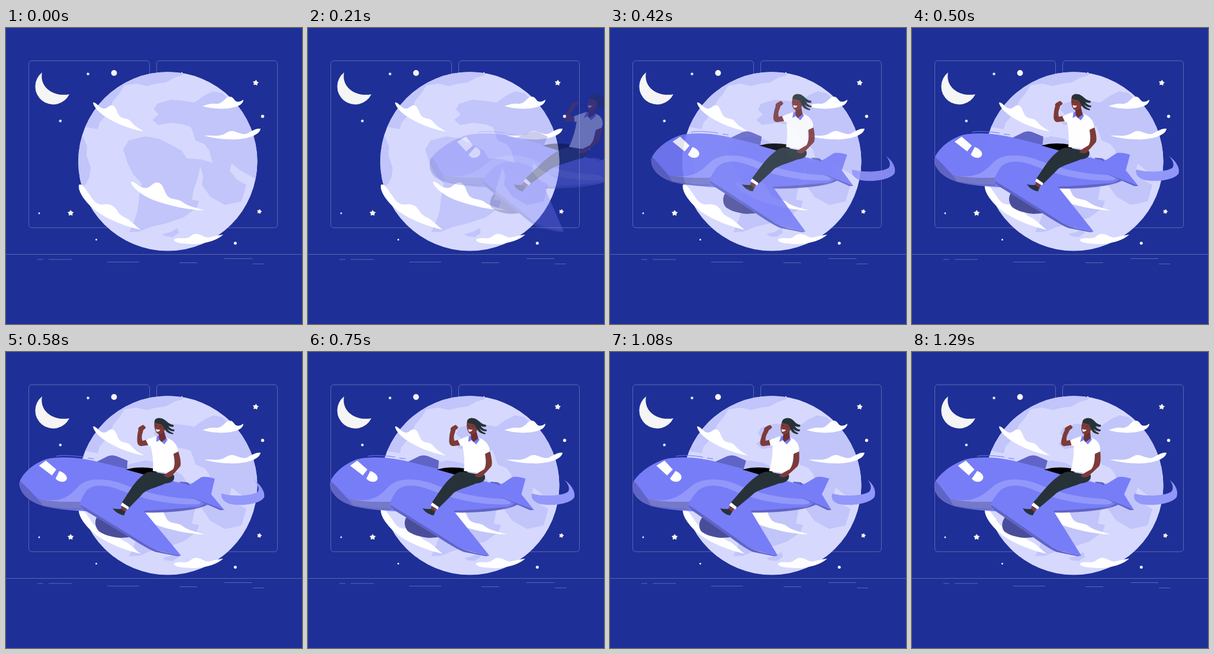
Animation of 500 by 500 pixels, one loop 1.33 s. Source, as an HTML page:

```html
<!DOCTYPE html>
<html lang="en">
<head>
<meta charset="utf-8">
<title>Night flight</title>
<style>
  html, body { margin: 0; height: 100%; overflow: hidden; background: #1e2f97; }
  svg { display: block; width: 100vw; height: 100vh; }
</style>
</head>
<body>
<svg viewBox="0 0 500 500">
  <defs>
    <clipPath id="disc"><circle cx="273.3" cy="225.4" r="151.2"/></clipPath>
    <path id="star" d="M0-1L.36-.42 1-.3 .55.18 .6.85 0 .56-.6.85-.55.18-1-.3-.36-.42Z" stroke-width=".25" stroke-linejoin="round"/>
  </defs>

  <g fill="none" stroke="#fff" stroke-opacity=".27">
    <rect x="38.5" y="55.3" width="204" height="282" rx="5"/>
    <rect x="254.5" y="55.3" width="204" height="282" rx="5"/>
    <path d="M0 382.4H500M53 391h10M72 391h39M171 395.4h54M293 396.5h30M369 389.5h47M417 398.5h19"/>
  </g>

  <g fill="#f5f5f5">
    <path d="M61 75A30.3 30.3 0 1 0 107 112C80 117 56 100 61 75Z"/>
    <circle cx="182.5" cy="76" r="4.9"/>
    <circle cx="433.5" cy="149.2" r="2.7"/>
    <circle cx="387.3" cy="363.6" r="2.5"/>
    <circle cx="152.5" cy="357.6" r="1.5"/>
    <circle cx="56" cy="313" r="1.4"/>
    <circle cx="297" cy="76" r="1.3"/>
    <g stroke="#f5f5f5">
      <use href="#star" transform="translate(138.5 77.6) rotate(-10) scale(2.4)"/>
      <use href="#star" transform="translate(91.8 157) rotate(-10) scale(2.4)"/>
      <use href="#star" transform="translate(421.8 92.6) rotate(8) scale(4.3)"/>
      <use href="#star" transform="translate(109.2 312.6) scale(4.4)"/>
      <use href="#star" transform="translate(428 310) rotate(15) scale(3.6)"/>
    </g>
  </g>

  <g clip-path="url(#disc)">
    <path fill="#d6d9fd" d="M120 70H430V380H120Z"/>
    <path fill="#c1c5fa" d="M120 165L138 168 155 171 158 160 174 142 181 123 192 110 200 97 220 94 238 98 254 94 270 92 284 84 298 80 300 60H120Z
      M120 180L130 183 137 200 136 215 143 236 141 252 135 264 120 270Z
      M247 155L257 164 280 160 300 163 312 167 317 180 320 190 335 196 343 206 349 228 330 222 305 220 297 207 280 198 258 187 235 183 207 190 198 205 206 230 215 247 229 263 225 285 222 310 215 330 208 345 225 344 245 336 270 330 300 320 322 304 326 292 314 290 318 270 325 250 328 234 333 250 331 265 345 285 370 299 398 293 406 265 390 256 378 241 381 229 395 240 420 254 430 254V130L400 125 378 122 366 110 350 107 335 114 318 126 300 123 278 121 255 128 250 138 258 146Z
      M264 348L277 345 290 338 292 346 282 353 270 352Z"/>
  </g>

  <path fill="#fff" d="M147 126C152 124 157 135 164 136C172 137 174 128 181 131C188 135 187 147 195 151C201 154 206 152 211 158C218 167 226 170 233 175C210 171 185 161 168 150C156 142 148 133 147 126Z
    M332 132C340 129 347 127 354 128C367 129 370 116 378 116C385 116 385 124 391 124.500C395 125 398 123 401 121C401 128 393 133 380 135C364 138 346 136 332 132Z
    M335 182C345 181 355 183 363 181C372 179 375 173 383 174C392 176 397 180 405 179C413 176 420 169 430 170C429 180 410 187 390 188C370 189 350 186 335 182Z
    M211 260C216 257 222 268 233 270C245 272 246 260 256 261C266 262 267 277 273 284C281 291 289 288 297 293C306 301 322 304 335 308C310 308 275 300 250 291C230 283 213 270 211 260Z
    M123 265C129 261 136 275 143 284C150 296 157 299 165 298C174 297 181 299 187 307C190 313 194 317 203 321C213 327 219 335 228 341C205 336 175 325 155 311C137 298 121 278 123 265Z
    M284 357C292 353 301 357 308 354C314 351 316 347 323 348C331 349 335 354 342 354C352 352 358 350 367 349C357 358 340 364 320 365C300 365 282 363 284 357Z"/>

  <g id="flight" opacity="0">
    <!-- plane -->
    <path fill="#9297fa" d="M376 239C395 245 428 243 438 236C443 230 440 222 435 216C447 225 450 237 447 245C440 256 408 261 388 257C377 254 373 247 376 239Z"/>
    <path fill="#5f64c6" d="M175 186L197 176Q205 173 212 176L229 183.500 225 198ZM309 219L322 220 332 228 314 226Z"/>
    <path fill="none" stroke="#6f76f0" d="M110 176C122 174 140 175 156 177.500M163 179l10 1.500"/>
    <path fill="#4a4e9a" d="M160 276C152 283 150 294 155 302C161 308 175 313 190 314L205 313Z"/>
    <g fill="#777df7">
      <path d="M38 222C42 211 63 190 92 181C120 175 155 179 180 186C225 196 280 215 320 223L350 250V258C310 272 260 272 200 271C150 270 100 268 70 260C48 253 36 240 38 222Z"/>
      <path d="M310 229C325 226 335 219 345 213Q351 208 370 214L358 241 330 255Z"/>
    </g>
    <path fill="#9297fa" d="M64 248C105 257 122 240 138 226C155 212 185 213 208 221C250 240 300 250 345 248L335 257C290 260 245 250 208 234C180 222 160 224 148 235Q140 244 134 254V265C110 265 85 262 70 259Z"/>
    <path fill="#000" fill-opacity=".2" d="M39 217C50 228 56 238 64 248C90 254 115 253 137 253L134 266C100 267 60 261 48 250C40 242 37 230 39 217ZM238 268C275 267 310 263 330 262C337 261 342 258 348 253C349 262 330 266 300 269C280 271 255 272 238 271Z"/>
    <path fill="#777df7" d="M319 244L340 243 358 240 375 267 366 264Z"/>
    <path fill="#5f64c6" d="M319 244L368 267H375L364 262Z"/>
    <path fill="#777df7" d="M137 252C150 253 160 258 175 262L235 262 286 344Q262 340 240 332L134 262Q131 254 137 252Z"/>
    <path fill="#5f64c6" d="M133.500 258Q134 263 140 268L205 313Q235 335 245 338L280 345 286 344C262 340 245 335 237 330L160 276Z"/>
    <path fill="#fff" d="M77.500 192L91 183.500 105.500 198.500 96 208.500ZM110 201C117 203 122 209 120 214C117 221 106 221 101 214Z"/>

    <!-- rider -->
    <path d="M223 198.500C240 194 255 194 272 197L275 206 255 208Z"/>
    <path fill="#7d3a38" d="M270 148L272 157 257 159Q251 158 252 151Q254 140 258 132C257 127 264 125 268 123L271.500 127C270 131 266 130 265 135Q260 143 261 150Z"/>
    <path fill="#fff" d="M267 149C275 146 282 143 287 142L303 145C312 148 317 154 318 163L317 171 308 173C308 185 307 196 304 206C292 204 280 203 268 201C272 188 274 172 273 158L270 159Z"/>
    <path fill="#263238" d="M272 203C285 206 297 207 302 208C303 216 297 221 285 222C266 230 249 232 240 242L214 264 203 256C218 240 230 222 247 210C256 203 262 201 272 203Z"/>
    <path fill="#7d3a38" d="M309 172L318 168C319 178 319 188 316 193L299 209C294 213 288 212 285 209L292 204 303 198C308 191 309 182 309 172Z"/>
    <path fill="#777df7" d="M287 142L284 152 290 149 297 156 304 148 300 142Z"/>
    <path fill="#6b302f" d="M291 136L301 133 302 146 293 152 290 147Z"/>
    <path fill="#7d3a38" d="M288 118C285 126 285 138 292 139C298 139 303 133 306 125L302 115Z"/>
    <path fill="#263238" d="M288 119C288 112 298 109 305 114C310 117 311 122 319 123L319 126C315 127 313 126 310 125C312 129 315 131 319 131L318 134C313 134 309 132 307 129C309 134 313 136 316 137L315 139C309 138 305 136 303 131L300 124C298 120 293 122 288 119Z"/>
    <path fill="#fff" d="M288 130Q291 132 295 131Q292 136 288 134Z"/>
    <path fill="none" stroke="#263238" stroke-width=".8" d="M288 124l3 .5M295 125l3 1"/>
    <path fill="#fff" d="M205 254L215 262 212.500 266 202 259Z"/>
    <path fill="#7d3a38" d="M203 260L210.500 265 207 271 200 267Z"/>
    <path fill="#263238" d="M187 264Q195 266 201 265L207 270 204 276Q192 274 187 264Z"/>
  </g>
</svg>
<script>
  const LOOP = 1330, DURATION = 1270, LEAD = 15;
  const TRAVEL = 245, MID_Y = 228;
  const flight = document.getElementById('flight');

  const cubic = (a, b, s) => 3 * (1 - s) ** 2 * s * a + 3 * (1 - s) * s * s * b + s ** 3;

  // cubic-bezier(.36, -.01, .5, 1.38)
  function ease(x) {
    let lo = 0, hi = 1;
    for (let i = 0; i < 24; i++) {
      const mid = (lo + hi) / 2;
      if (cubic(.36, .5, mid) < x) lo = mid; else hi = mid;
    }
    return cubic(-.01, 1.38, lo);
  }

  function pose(k) {
    if (k < .6) {
      const p = ease(k / .6);
      return { x: TRAVEL * (1 - p), skew: -20 + 30 * p, opacity: p };
    }
    if (k < .8) return { x: 0, skew: 10 - 12 * ease((k - .6) / .2), opacity: 1 };
    return { x: 0, skew: -2 + 2 * ease((k - .8) / .2), opacity: 1 };
  }

  function draw() {
    const t = performance.now() % LOOP;
    const { x, skew, opacity } = pose(Math.min(1, (t + LEAD) / DURATION));
    const slope = Math.tan(skew * Math.PI / 180);
    flight.setAttribute('transform', `matrix(1 0 ${slope} 1 ${x - slope * MID_Y} 0)`);
    flight.setAttribute('opacity', Math.max(0, Math.min(1, opacity)));
    requestAnimationFrame(draw);
  }
  draw();
</script>
</body>
</html>
```
